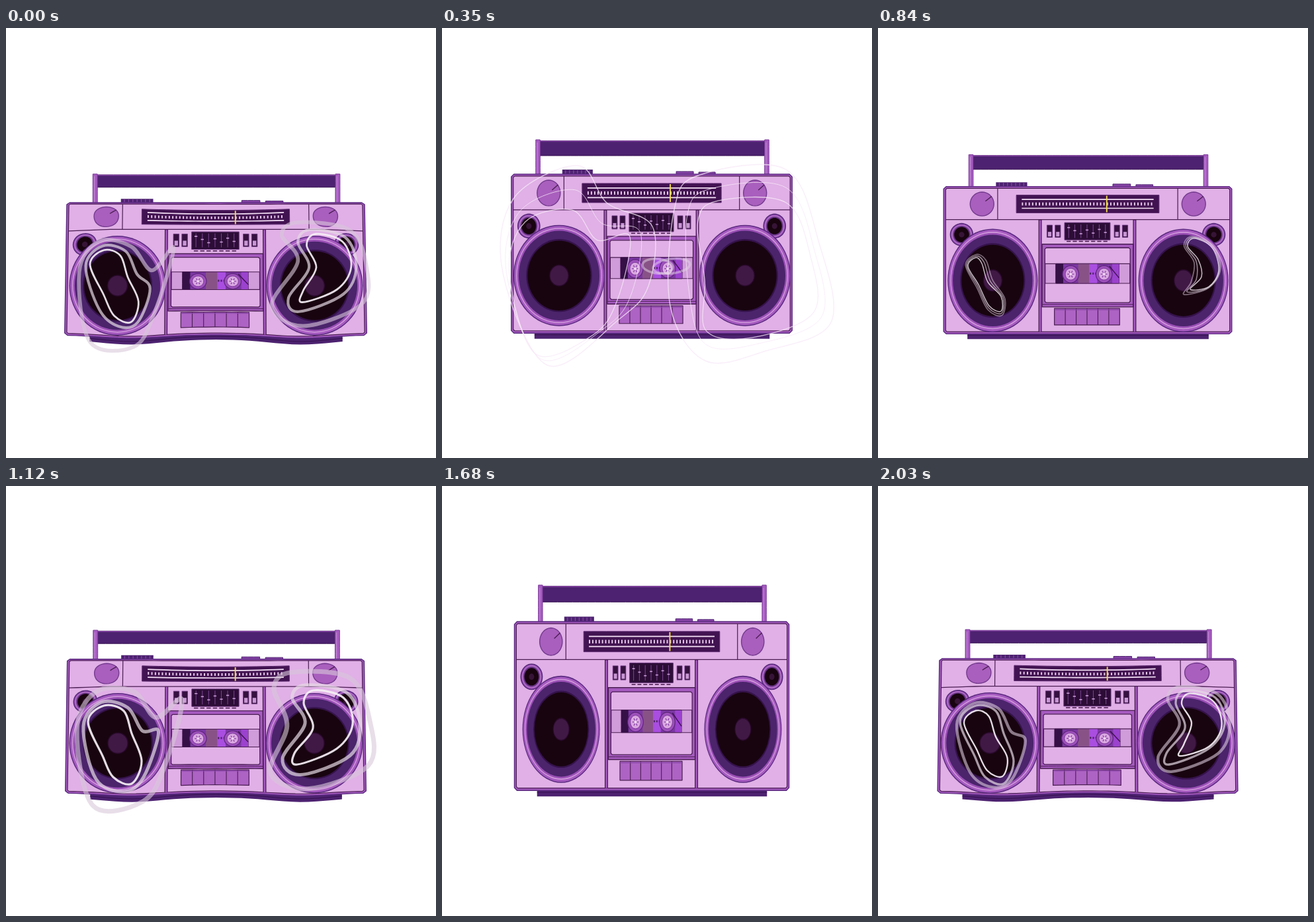
Write an HTML page with a canvas that moves like this. It is 650 px wide and 650 px high and loops after 2.1 s.

```html
<!DOCTYPE html>
<html lang="en">
<head>
<meta charset="utf-8">
<title>Bouncing boombox</title>
<style>
html, body { margin: 0; width: 100%; height: 100%; overflow: hidden; background: #fff; }
canvas { display: block; }
</style>
</head>
<body>
<canvas id="stage" width="650" height="650"></canvas>
<script>
const ctx = document.getElementById('stage').getContext('2d');
const STEP = 70, STEPS = 30, BEAT = 15;
const PALE = '#e0b0e6', PURPLE = '#a65bc0', MID = '#8744a6', DARK = '#4d2270', INK = '#4a1d52', BLACK = '#18040f';

// Nested contours, from small to wide; x,y pairs running clockwise
const LEFT = [
  [148,347, 157,356, 166,384, 186,406, 186,428, 168,420, 152,388, 136,360],
  [148,332, 178,340, 190,374, 205,416, 190,450, 162,440, 146,408, 124,356],
  [140,322, 190,330, 222,366, 256,328, 226,430, 195,484, 126,478, 110,370],
  [108,258, 205,208, 250,265, 318,300, 312,390, 268,440, 160,510, 92,370]
];
const RIGHT = [
  [478,318, 505,332, 515,366, 500,391, 472,395, 489,376, 484,350, 468,330],
  [465,309, 510,320, 524,360, 500,397, 440,421, 436,404, 464,366, 450,328],
  [440,293, 520,305, 546,360, 540,418, 450,452, 400,420, 440,352, 415,312],
  [390,222, 520,214, 570,325, 588,445, 490,488, 398,503, 345,420, 352,270]
];
// Each ring: how far it has spread and how thick it is, by steps around the squash
const RINGS = [
  { grow: [[-3, 0], [-1, .5], [1, 1], [5, 2.45]], width: [[-3, 1.5], [1, 3.2], [5, 1.3]], color: '#f6eff6', alpha: .92 },
  { grow: [[-3, .15], [-1, 1], [1, 1.5], [5, 2.7]], width: [[-3, 1.6], [1, 5], [5, 1]], color: '#e6dae6', alpha: .7 },
  { grow: [[-3, .3], [-1, 1.35], [0, 1.95], [5, 3]], width: [[-3, 1.8], [1, 7], [5, 1.4]], color: '#d9c9da', alpha: .6 }
];
const CONE_X = [[0, 73], [5, 69], [9, 58.5], [14, 74.5], [16, 73.5], [20, 63], [24, 58.5], [29, 74.5]];
const CONE_Y = [[0, 75.5], [5, 76.5], [9, 81], [14, 76.5]];

let pose;

function at(keys, t) {
  if (t <= keys[0][0]) return keys[0][1];
  for (let i = 1; i < keys.length; i++) {
    const [t0, v0] = keys[i - 1], [t1, v1] = keys[i];
    if (t <= t1) return v0 + (v1 - v0) * (t - t0) / (t1 - t0);
  }
  return keys[keys.length - 1][1];
}

const bell = (v, mid, w) => Math.exp(-(((v - mid) / w) ** 2));

function setPose(p) {
  const angle = (24 * p - 9 * Math.sin(Math.PI * p / BEAT)) * Math.PI / 180;
  const s = (1 + Math.cos(angle)) / 2;
  pose = { top: 201.5 + 62.5 * s, bottom: 459.5 + 4 * s, half: 206.5 + 18.5 * s, bulge: Math.max(0, (s - .65) / .35) };
}

// Maps a point of the rest drawing to the squashed, bulging body
function warp(x, y) {
  const u = (x - 317) / 212, v = (y - 220) / 240, q = pose.bulge;
  let dy = 0;
  if (v > 0) {
    const off = Math.abs(u) * 212;
    dy -= 3 * bell(v, .1, .06) * Math.min(1, (off / 110) ** 2);
    dy -= 5 * bell(v, .26, .1) * (off > 150 ? 1 - (off - 150) / 110 : 1);
    dy += (v > 1.01 ? 8 : 5) * bell(v, 1, .15) * bell(off, 120, 60);
  }
  const spread = 1 + .015 * q * Math.min(1, Math.max(0, v));
  return [317 + u * pose.half * spread, pose.top + v * (pose.bottom - pose.top) + dy * q];
}

function paint(fill, stroke, width) {
  if (fill) { ctx.fillStyle = fill; ctx.fill(); }
  if (stroke) { ctx.strokeStyle = stroke; ctx.lineWidth = width || 1; ctx.stroke(); }
}

function trace(pts, closed) {
  ctx.beginPath();
  ctx.moveTo(...warp(...pts[0]));
  const n = pts.length;
  for (let i = 1; i < n + (closed ? 1 : 0); i++) {
    const [ax, ay] = pts[i - 1], [bx, by] = pts[i % n];
    const cuts = Math.ceil(Math.hypot(bx - ax, by - ay) / 12) || 1;
    for (let k = 1; k <= cuts; k++) ctx.lineTo(...warp(ax + (bx - ax) * k / cuts, ay + (by - ay) * k / cuts));
  }
  if (closed) ctx.closePath();
}

function box(l, t, r, b, fill, stroke, width, cut = 0) {
  trace(cut
    ? [[l + cut, t], [r - cut, t], [r, t + cut], [r, b - cut], [r - cut, b], [l + cut, b], [l, b - cut], [l, t + cut]]
    : [[l, t], [r, t], [r, b], [l, b]], true);
  paint(fill, stroke, width);
}

function line(x0, y0, x1, y1, color, width) {
  trace([[x0, y0], [x1, y1]], false);
  paint(null, color, width);
}

function disc(x, y, rx, ry, fill, stroke, width) {
  const pts = [];
  for (let i = 0; i < 36; i++) pts.push([x + rx * Math.cos(i * Math.PI / 18), y + ry * Math.sin(i * Math.PI / 18)]);
  trace(pts, true);
  paint(fill, stroke, width);
}

function handle() {
  box(148, 169.5, 487, 192, DARK, '#351050', 1);
  line(148, 170, 487, 170, MID, 1.6);
  for (const x of [142, 487.5]) {
    box(x, 168, x + 6.5, 221, PURPLE, '#7a3a98', 1);
    line(x + 2.2, 172, x + 2.2, 220, '#c48bd6', 1);
  }
}

function shell() {
  box(140, 457, 495, 469, DARK);
  line(140, 463, 495, 463, '#35104e', 1);
  box(182, 213, 228, 222, DARK);
  for (let x = 187; x < 228; x += 6) line(x, 214, x, 219, MID, 1.2);
  box(354, 216, 380, 222, MID, DARK, 1);
  box(388, 217, 413, 222, MID, DARK, 1);
  box(105, 220, 529, 460.5, PURPLE, '#5b2a80', 1.4, 4);
  box(108, 223, 526, 457, PALE, INK, 1.2, 2);
  line(108, 274, 526, 274, INK, 1.3);
  for (const x of [184.5, 449.5]) line(x, 223, x, 274, INK, 1.2);
}

function tuner() {
  box(212, 234, 422, 263, '#421351', '#5d2a70', 1);
  for (const y of [241, 255.5]) line(220, y, 414, y, '#f5e2f7', 1.7);
  for (let i = 0; i < 39; i++) {
    const x = 221 + i * 5;
    line(x, 246, x, 251, '#ecd0f0', 1.9);
  }
  line(345, 235, 345, 262, '#f0dc4a', 1.9);
}

function knobs() {
  for (const x of [161.5, 473]) {
    disc(x, 248.5, 17.5, 19.5, '#a95fbd', '#753a90', 1.4);
    line(x + 5, 244, x + 14, 236, INK, 1.3);
  }
  for (const x of [131.5, 502.5]) {
    disc(x, 298.5, 16.5, 18, PURPLE, '#58297c', 1.6);
    disc(x, 298.5, 13.5, 15, '#6a3488', '#c58ad2', .8);
    disc(x, 298.5, 11, 12.5, BLACK);
    disc(x, 298.5, 4, 4.5, '#371437');
  }
}

function middle() {
  for (const x of [247, 386]) {
    line(x, 274, x, 457, INK, 5);
    line(x, 275, x, 457, PURPLE, 2.4);
  }
  for (const x of [257, 269, 356, 368]) {
    box(x, 283, x + 8, 303, '#35113f', '#6d3583', .8);
    box(x + 1.5, 294, x + 6.5, 301.5, '#c896d4');
  }
  box(283, 279, 350, 307, '#2c0d36', '#5d2a70', 1);
  for (let i = 0; i < 7; i++) {
    const x = 289 + i * 9, y = 287 + (i * 5) % 11;
    line(x, 282, x, 304, '#74408a', 1.1);
    line(x - 2, y, x + 2, y, '#c99bd8', 1.6);
  }
  for (let x = 286; x < 346; x += 9) line(x, 309.5, x + 6, 309.5, INK, 1.6);

  box(250, 314, 384, 416.5, PURPLE, INK, 1.4);
  box(254, 320, 379.5, 409.5, PALE, INK, 1.3, 2);
  box(254.5, 346, 379, 378, '#d09cd9', INK, 1.1);
  cassette();
  line(250, 412.5, 384, 412.5, INK, 1);
  box(268, 419, 364, 446, '#ad63c3', INK, 1.2);
  for (let x = 284; x < 364; x += 16) line(x, 419, x, 446, INK, 1.1);
  line(268, 421, 364, 421, MID, 1.2);
}

function cassette() {
  box(270, 346, 363, 378, '#7c37a4', INK, 1);
  box(270, 346, 281, 378, '#351047');
  box(303, 346.5, 319, 377.5, '#885287');
  box(319, 346.5, 331, 377.5, '#a94ee0');
  box(353, 346.5, 363, 377.5, '#9b42ce');
  for (let x = 320; x < 331; x += 4) line(x, 362, x + 2, 362, '#502068', 3);
  for (const x of [292, 341]) {
    disc(x, 363, 12, 14, '#9d50bb', '#5e267b', 1.2);
    disc(x, 363, 8, 9.5, '#dba8e2', '#7a3a98', 1);
    for (let k = 0; k < 3; k++) {
      const c = 5 * Math.cos(k * Math.PI / 3), s = 6 * Math.sin(k * Math.PI / 3);
      line(x - c, 363 - s, x + c, 363 + s, MID, 1.3);
    }
    disc(x, 363, 2, 2.4, '#f0d4f2');
  }
  line(349, 350, 363, 369, '#401052', 1.4);
}

function speaker(side, i) {
  const x = 317.5 + side * pose.half * .662;
  const y = pose.top + .639 * (pose.bottom - pose.top) - 2 * pose.bulge;
  const rx = at(CONE_X, i), ry = at(CONE_Y, i % BEAT);
  const ring = (k, fill) => {
    ctx.beginPath();
    ctx.ellipse(x, y, rx * k, ry * k, 0, 0, 7);
    paint(fill);
  };
  ring(1, '#5b2a80');
  ring(.98, PURPLE);
  ring(.94, '#d29bdc');
  ring(.92, '#9b50b6');
  ring(.885, '#4b246c');
  ring(.72, '#35124a');
  ring(.69, BLACK);
  ring(.215, '#2a0a2c');
  ring(.195, '#411945');
}

function blob(set, stage) {
  const i = Math.min(set.length - 2, Math.floor(stage)), f = stage - i, n = set[0].length / 2;
  const pt = k => {
    k = (k + n) % n * 2;
    return [0, 1].map(d => set[i][k + d] + (set[i + 1][k + d] - set[i][k + d]) * f);
  };
  ctx.beginPath();
  ctx.moveTo(...pt(0));
  for (let k = 0; k < n; k++) {
    const [a, b, c, d] = [pt(k - 1), pt(k), pt(k + 1), pt(k + 2)];
    ctx.bezierCurveTo(b[0] + (c[0] - a[0]) / 6, b[1] + (c[1] - a[1]) / 6,
      c[0] - (d[0] - b[0]) / 6, c[1] - (d[1] - b[1]) / 6, c[0], c[1]);
  }
}

function waves(p) {
  const t = p > 9 ? p - BEAT : p;
  const fade = at([[-5, 0], [-3, .85], [-1, 1], [4, 1], [5, .9], [7, 0]], t);
  if (!fade) return;
  for (const r of [...RINGS].reverse()) {
    ctx.globalAlpha = fade * at([[1, r.alpha], [5, .85]], t);
    const color = t > 3 ? '#f8e9f8' : r.color;
    for (const set of [LEFT, RIGHT]) {
      blob(set, at(r.grow, t));
      paint(null, color, at(r.width, t));
    }
  }
  // Small loops where the two sides meet
  ctx.globalAlpha = at([[3, 0], [5, .5], [7, 0]], t);
  if (ctx.globalAlpha) {
    for (const [x, w] of [[326, 23], [347, 28]]) {
      ctx.beginPath();
      ctx.ellipse(x, 360, w, 11, x < 330 ? .1 : -.12, 0, 7);
      paint(null, '#e6d6e8', 3.5);
    }
  }
  ctx.globalAlpha = 1;
}

function draw(i) {
  setPose(i % BEAT);
  ctx.fillStyle = '#fff';
  ctx.fillRect(0, 0, 650, 650);
  handle();
  shell();
  tuner();
  knobs();
  middle();
  speaker(-1, i);
  speaker(1, i);
  waves(i % BEAT);
}

const start = performance.now();
function tick() {
  draw(Math.floor((performance.now() - start) / STEP) % STEPS);
  requestAnimationFrame(tick);
}
ctx.lineJoin = 'round';
tick();
</script>
</body>
</html>
```
